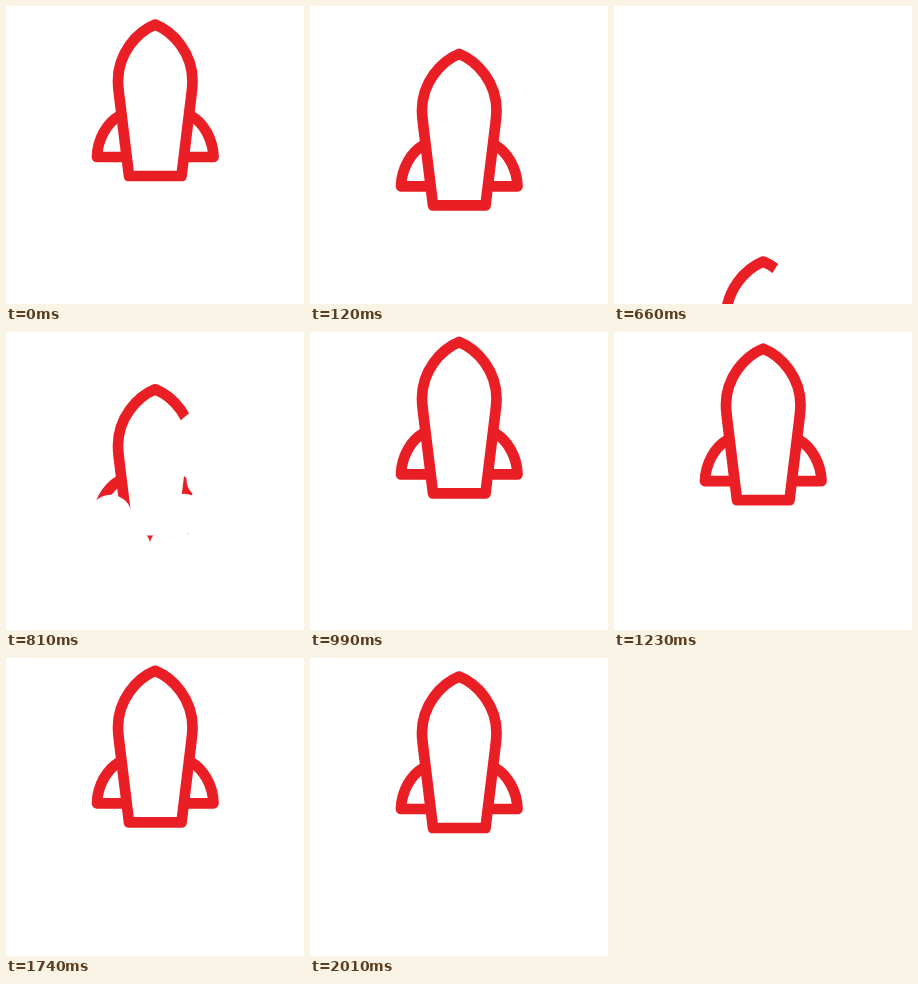
These frames come from a looping animation (298x298 px, 2310 ms). An HTML page with a canvas:

```html
<!DOCTYPE html>
<html>
<head>
<meta charset="utf-8">
<style>
html, body { margin: 0; width: 100%; height: 100%; overflow: hidden; background: #fff; }
canvas { display: block; }
</style>
</head>
<body>
<canvas id="stage" width="298" height="298"></canvas>
<script>
const ctx = document.getElementById('stage').getContext('2d');
const SIZE = 298, LOOP = 2310, STEP = 30;
const PAPER = '#fff', RED = '#ea1f25';

const hull = new Path2D('M149.2 18.5C131 26 112 47 112 75Q112 80 113 88L123 170H175.5L185.5 88Q186.5 80 186.5 75C186.5 47 167.5 26 149.2 18.5Z');
const fins = new Path2D('M113 110C101 117 91.5 133 91 151H119M185.5 110C197.5 117 207 133 207.5 151H179.5');

// Smoke puffs relative to the rocket: x, y, radius
const puffs = [
  [104.5, 145.5, 21.5], [123, 177, 21.8], [128, 154, 9], [165, 177, 21.8],
  [178, 143, 20], [207, 138, 25], [199, 109, 18.5], [205, 76, 40]
];

// Hovering: time and height of each turning point
const hover = [[930, -10], [1170, 0], [1380, -10], [1590, 0], [1800, -7], [2010, 0]];

// Vertical offset of the rocket, or null while it is away
function height(t) {
  if (t < 300) return 290 * (t / 300) ** 2.5;
  if (t < 660) return null;
  if (t < 930) return 305 * ((930 - t) / 300) ** 2 - 10;
  const next = hover.findIndex(([time]) => time > t);
  if (next < 0) return 0;
  const [t0, y0] = hover[next - 1], [t1, y1] = hover[next];
  return y0 + (y1 - y0) * (1 - Math.cos((t - t0) / (t1 - t0) * Math.PI)) / 2;
}

function drawPuffs(t, y) {
  const scale = Math.min(1.3, (930 - t) / 120);
  const drift = (t - 810) * 0.15;
  ctx.fillStyle = PAPER;
  for (const [px, py, r] of puffs) {
    ctx.beginPath();
    ctx.arc(px, py + y + drift, r * scale, 0, 2 * Math.PI);
    ctx.fill();
  }
}

function draw(t) {
  ctx.fillStyle = PAPER;
  ctx.fillRect(0, 0, SIZE, SIZE);
  const y = height(t);
  if (y === null) return;

  ctx.save();
  ctx.translate(0, y);
  ctx.strokeStyle = RED;
  ctx.lineWidth = 10.7;
  ctx.lineJoin = ctx.lineCap = 'round';
  ctx.stroke(fins);
  ctx.fill(hull);
  ctx.stroke(hull);
  ctx.restore();

  if (t < 300) ctx.fillRect(0, 244, SIZE, SIZE - 244);
  else if (t < 930) drawPuffs(t, y);
}

const start = performance.now();
function frame() {
  const t = (performance.now() - start) % LOOP;
  draw(Math.floor(t / STEP) * STEP);
  requestAnimationFrame(frame);
}
frame();
</script>
</body>
</html>
```
